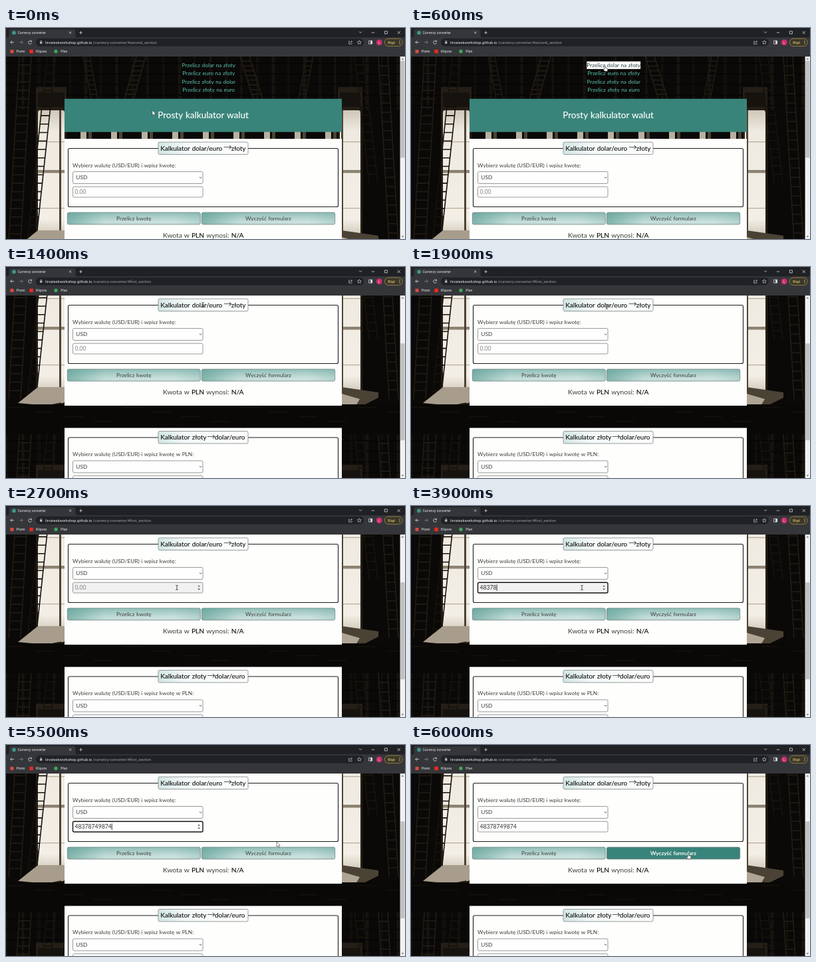
Write an HTML page that moves like this. It is 600 by 318 pixels and loops after 6100 ms.

```html
<!DOCTYPE html>
<html lang="pl">
<head>
<meta charset="utf-8">
<title>Currency converter</title>
<style>
  html, body { margin: 0; width: 100%; height: 100%; overflow: hidden; background: #0e0b08; }
  svg { display: block; width: 100%; height: 100%; }
  .page text { font-family: Lato, "Open Sans", sans-serif; word-spacing: .057em; fill: #3d3d3d; }
  .page .link text { fill: #5cc3b1; }
  .page .link.on text { fill: #24433f; }
  .link rect { fill: none; }
  .link.on rect { fill: #fff; }
  .page .strong { fill: #111; stroke: #111; stroke-width: .1; }
  .page .title { fill: #fff; stroke: #fff; stroke-width: .15; }
  .page .btn.on text { fill: #fff; stroke: #fff; stroke-width: .2; }
  .btn.on .face { fill: #39847a; }
  .btn.on .shade { display: none; }
  .ui text { font-family: Roboto, "Open Sans", sans-serif; fill: #e8eaed; }
  .line { fill: none; stroke: #dfe1e5; stroke-width: .75; }
</style>
</head>
<body>
<svg id="stage" viewBox="0 0 600 318" preserveAspectRatio="none"></svg>
<script>
const LOOP = 6100, STEP = 100, JUMP = 1400, SCROLL = 124;
const AMOUNT = '48378749874', TYPED = [1, 2, 4, 5, 7, 9, 11];
const LINKS = ['dolar na złoty', 'euro na złoty', 'złoty na dolar', 'złoty na euro'];
const PATH = [
  [0, 220, 124], [700, 296, 53], [1300, 296, 53], [1400, 296, 57], [1800, 296, 57],
  [2600, 257, 123], [4900, 257, 123], [5000, 256, 127], [5300, 345, 141],
  [5600, 438, 148], [5700, 430, 159], [5900, 417, 163.5]
];

const rect = (x, y, w, h, fill, more = '') =>
  `<rect x="${x}" y="${y}" width="${w}" height="${h}" fill="${fill}" ${more}/>`;
const text = (x, y, size, str, more = '') =>
  `<text x="${x}" y="${y}" font-size="${size}" ${more}>${str}</text>`;
const line = (d, more = '') => `<path d="${d}" class="line" ${more}/>`;
const repeat = (n, fn) => Array.from({ length: n }, (_, i) => fn(i)).join('');
const middle = 'text-anchor="middle"';

function ladder(x1, y1, x2, y2, w, n, color, weight = 1.6) {
  let d = `M${x1} ${y1}L${x2} ${y2}M${x1 + w} ${y1}L${x2 + w} ${y2}`;
  for (let i = 1; i < n; i++) d += `M${x1 + (x2 - x1) * i / n} ${y1 + (y2 - y1) * i / n}h${w}`;
  return `<path d="${d}" fill="none" stroke="${color}" stroke-width="${weight}"/>`;
}

// Tall window: dark lintel, two rows of bright panes, one mullion
function tallWindow(x, w, mullion) {
  return rect(x - 3, 46, w + 6, 242, '#241e16') + rect(x, 54, w, 22, '#16130e') +
    rect(x, 81, w, 205, 'url(#day)', 'rx="3"') +
    rect(x, 128, w, 1.2, '#b5aa98') + rect(x, 171, w, 4.5, '#8d8271') +
    rect(x, 228, w, 1.2, '#b5aa98') + rect(mullion, 81, 3, 205, '#4d4336');
}

// Old library: dark shelves above, windows at both sides
function room() {
  return rect(0, 0, 600, 333.5, '#0a0907') +
    repeat(26, i => rect(i * 23.5, 0, 3 + i % 3, 80, i % 2 ? '#17130e' : '#110f0b')) +
    repeat(5, i => rect(0, 9 + i * 16, 600, 2, '#060504', 'opacity=".75"')) +
    ladder(116, 0, 128, 64, 10, 9, '#1f1912') + ladder(196, 0, 178, 64, 14, 9, '#241d15') +
    ladder(352, 0, 372, 64, 14, 9, '#241d15') + ladder(452, 0, 440, 64, 10, 9, '#1f1912') +
    repeat(9, i => rect(112 + i * 46, 113, 9, 12, '#b9b0a1') + rect(124 + i * 46, 113, 5, 12, '#4b4337')) +
    tallWindow(48, 40, 80) + tallWindow(502, 31, 504) +
    ladder(20, 0, 4, 280, 18, 22, '#231b13') + ladder(62, 0, 32, 280, 13, 22, '#17120d') +
    ladder(560, 0, 576, 280, 14, 20, '#241c14') + ladder(524, 0, 546, 190, 13, 15, '#17130e') +
    '<path d="M18 286L48 262H88V284L60 290Z" fill="#a89d8c"/>' +
    '<path d="M505 262L560 270V278L536 290H505Z" fill="#4b4236"/>' +
    '<path d="M505 272L532 280 526 290H505Z" fill="#b0a594"/>' +
    rect(0, 288, 600, 46, '#090806') +
    repeat(14, i => rect(i * 44, 292 + i % 4 * 7, 28, 1.5, '#15110c'));
}

function button(id, x, w, label) {
  const box = `rx="2.2" stroke="#71817f" stroke-width=".8"`;
  return `<g class="btn" id="${id}">` +
    `<rect class="face" x="${x}" y="278" width="${w}" height="18" fill="url(#side)" ${box}/>` +
    `<rect class="shade" x="${x}" y="278" width="${w}" height="18" fill="url(#top)" rx="2.2"/>` +
    text(x + w / 2, 289.8, 8.25, label, middle) + '</g>';
}

function card(n, dy, from, to, arrowX, label) {
  return `<g transform="translate(0 ${dy})">` +
    rect(88, 167, 417, 166, '#fefefc') +
    rect(93.5, 181.5, 406, 88, 'none', 'rx="2" stroke="#1c1c1c" stroke-width="1.1"') +
    rect(229, 172, 135, 18.5, 'url(#legend)', 'rx="2" stroke="#7b8583" stroke-width=".8"') +
    text(232.3, 184.8, 9.95, from, 'class="strong"') +
    text(arrowX, 185.2, 12.5, '→', 'style="font-family:\'Noto Sans CJK JP\',\'DejaVu Sans\',sans-serif"') +
    text(arrowX + 11.5, 184.8, 9.95, to, 'class="strong"') +
    text(100, 209.8, 8.28, label) +
    rect(100.5, 216.5, 195.5, 18, '#fefefe', 'rx="2" stroke="#808080" stroke-width=".8"') +
    text(105.3, 228.4, 8.3, 'USD') +
    '<path d="M291 224.6l1.6 1.7 1.6-1.7" fill="none" stroke="#222" stroke-width=".8"/>' +
    rect(100.5, 239.2, 195.5, 15.8, '#fefefe', `id="field${n}" rx="2" stroke="#808080" stroke-width=".8"`) +
    text(103.5, 250.1, 8.67, '0.00', `id="value${n}" style="fill:#858585"`) +
    button('calc' + n, 92.3, 200, 'Przelicz kwotę') + button('clear' + n, 294.3, 200.4, 'Wyczyść formularz') +
    text(236, 315.9, 10.25, 'Kwota w <tspan class="strong">PLN</tspan> wynosi: <tspan class="strong">N/A</tspan>') +
    '</g>';
}

function page() {
  return `<g class="page" id="page"><g transform="translate(0 43)">${room()}</g>` +
    `<g transform="translate(0 376)">${room()}</g>` +
    LINKS.map((s, i) => `<g class="link" id="link${i}">` +
      `<rect x="264.3" y="${50.4 + i * 12.45}" width="80.8" height="11.4"/>` +
      text(304.7, 58.9 + i * 12.45, 8.3, 'Przelicz ' + s, middle) + '</g>').join('') +
    rect(88, 106.7, 417, 50, '#39847a') +
    text(296.5, 136, 13.5, 'Prosty kalkulator walut', 'class="title" ' + middle) +
    card(1, 0, 'Kalkulator dolar/euro', 'złoty', 327.2, 'Wybierz walutę (USD/EUR) i wpisz kwotę:') +
    card(2, 199.5, 'Kalkulator złoty', 'dolar/euro', 302.4, 'Wybierz walutę (USD/EUR) i wpisz kwotę w PLN:') +
    '<path id="spin" d="M288.4 245.6l1.7-2.2 1.7 2.2zM288.4 248.6l1.7 2.2 1.7-2.2z" fill="#444"/>' +
    '<rect id="caret" y="242.3" width=".8" height="9.6" fill="#111"/></g>';
}

function browser() {
  return '<g class="ui">' +
    rect(592.6, 43, 7.4, 275, '#f1f1f1') + rect(593.2, 0, 6.2, 146, '#c1c1c1', 'id="thumb"') +
    '<path d="M594.6 47.4l1.8-2 1.8 2zM594.6 313.4l1.8 2 1.8-2z" fill="#606060"/>' +
    rect(0, 0, 600, 14.5, '#202124') + rect(0, 14, 600, 29, '#35363a') +
    '<path d="M2 14.5Q4.5 14 4.5 11V4Q4.5 1.8 7 1.8H102Q104.5 1.8 104.5 4V11Q104.5 14 107 14.5Z" fill="#35363a"/>' +
    '<circle cx="12" cy="7.2" r="2.9" fill="#3f9488"/>' +
    text(17.5, 9, 5.05, 'Currency converter') +
    line('M95 5.4l3.2 3.2m0-3.2l-3.2 3.2M110.2 7h4.6m-2.3-2.3v4.6') +
    line('M531 5.4l2 2 2-2M549.8 7h4.4M569.4 4.8h4v4h-4zM588.6 4.8l4.2 4.2m0-4.2l-4.2 4.2') +
    line('M12 21.5H6.8m2.3-2.4l-2.4 2.4 2.4 2.4') +
    line('M20 21.5h5.2m-2.3-2.4l2.4 2.4-2.4 2.4', 'style="stroke:#85878b"') +
    line('M38.2 20.3a2.5 2.5 0 1 0 .3 2.2M38.4 18.6v2h-2') +
    rect(45, 15.7, 493, 11.8, '#202124', 'rx="5.9"') +
    rect(51, 20.9, 3.4, 2.7, '#b8babd') +
    line('M51.7 21v-1a1 1 0 0 1 2 0v1', 'style="stroke:#b8babd"') +
    text(59, 23.5, 5.75, 'lirvateskworkshop.github.io') +
    text(130.5, 23.5, 5.75, '', 'id="path" style="fill:#9aa0a6"') +
    line('M517 20h-1.4v4.2h4.6v-1.3M517.3 22.6q.3-2.2 3-2.2m-1.2-1.4l1.5 1.4-1.5 1.5', 'style="stroke-width:.6"') +
    line('M531.3 18.6l.9 2 2.1.2-1.6 1.4.5 2.1-1.9-1.1-1.9 1.1.5-2.1-1.6-1.4 2.1-.2z', 'style="stroke-width:.6"') +
    line('M545.6 19.2h5v4.8h-5z') + rect(548.2, 19.2, 2.4, 4.8, '#dfe1e5') +
    '<circle cx="561.2" cy="21.7" r="4.5" fill="#c92d6b"/>' +
    text(561.2, 23.6, 5, 'L', middle) +
    rect(569.3, 16, 27, 11.4, '#3a372b', 'rx="5.7" stroke="#b79a45" stroke-width=".7"') +
    text(574.3, 23.6, 5.2, 'Błąd', 'style="fill:#f6d873"') +
    repeat(3, i => `<circle cx="592" cy="${19.7 + i * 2}" r=".6" fill="#f6d873"/>`) +
    rect(6.5, 32.8, 5, 5, '#dd4b3e') + text(15.6, 37.2, 5.2, 'Pismi') +
    rect(35.4, 32.6, 5.4, 5.4, '#f0281e') + text(45, 37.2, 5.2, 'Klipora') +
    '<circle cx="75" cy="35.3" r="2.7" fill="#3fa65a"/>' + text(82.2, 37.2, 5.2, 'Plan') +
    '</g>';
}

const pointers = {
  arrow: '<path d="M0 0V7.6L1.8 6 3 8.6 4.2 8 3 5.6H5.3Z" fill="#fff" stroke="#222" stroke-width=".5"/>',
  beam: '<path d="M-1.8-3.4Q0-3.4 0-2.6 0-3.4 1.8-3.4M0-2.8V2.8M-1.8 3.4Q0 3.4 0 2.6 0 3.4 1.8 3.4" fill="none" stroke="#222" stroke-width=".8"/>',
  hand: '<path d="M-.8.4Q0-.5.8.4V3.3L3.6 3.9Q4.2 4.1 4.1 5L3.5 8.3H-.4L-2.8 5.2Q-2.5 4.2-.8 5.2Z" fill="#fff" stroke="#222" stroke-width=".55"/>'
};

const gradient = (id, x2, y2, stops) =>
  `<linearGradient id="${id}" x1="0" y1="0" x2="${x2}" y2="${y2}">` +
  stops.map(([at, color, a = 1]) => `<stop offset="${at}" stop-color="${color}" stop-opacity="${a}"/>`).join('') +
  '</linearGradient>';

document.getElementById('stage').innerHTML = '<defs>' +
  gradient('day', 0, 1, [[0, '#cfc7b8'], [.15, '#eeeae0'], [.8, '#f3efe6'], [1, '#b9ae9c']]) +
  gradient('side', 1, 0, [[0, '#7fb3ab'], [.28, '#c2dcd8'], [.8, '#cbe1de'], [1, '#b2d2cd']]) +
  gradient('top', 0, 1, [[0, '#5b9e94', .5], [.75, '#5b9e94', 0]]) +
  gradient('legend', 1, 0, [[0, '#d2e6e3'], [.3, '#f3f9f8'], [1, '#fdfefd']]) +
  '</defs>' + page() + browser() +
  '<g id="pointer">' + Object.keys(pointers).map(k => `<g id="${k}">${pointers[k]}</g>`).join('') + '</g>';

const el = id => document.getElementById(id);
const show = (id, on) => { el(id).style.display = on ? '' : 'none'; };
const inside = ([x, y], x1, y1, x2, y2) => x >= x1 && x <= x2 && y >= y1 && y <= y2;

function position(t) {
  const i = PATH.findIndex(p => p[0] > t);
  if (i < 0) return PATH[PATH.length - 1].slice(1);
  const [t0, x0, y0] = PATH[i - 1], [t1, x1, y1] = PATH[i];
  let k = (t - t0) / (t1 - t0);
  if (t < 5000) k = k * k * (3 - 2 * k);
  return [x0 + (x1 - x0) * k, y0 + (y1 - y0) * k];
}

function caretOn(t) {
  if (t < 3100 || t >= 5800) return false;
  if (t < 3600) return t < 3400;
  if (t < 4700) return t < 4400;
  return Math.floor((t - 4700) / 300) % 2 === 0;
}

function draw(time) {
  const t = Math.floor(time % LOOP / STEP) * STEP;
  const scroll = t >= JUMP ? SCROLL : 0;
  const screen = position(t), at = [screen[0], screen[1] + scroll];

  el('page').setAttribute('transform', `translate(0 ${-scroll})`);
  el('thumb').setAttribute('y', 49.5 + scroll * .53);
  el('path').textContent = `/currency-converter/#${scroll ? 'first' : 'second'}_section`;

  let overLink = false;
  LINKS.forEach((_, i) => {
    const on = inside(at, 264, 50.4 + i * 12.45, 345, 62 + i * 12.45);
    el('link' + i).classList.toggle('on', on);
    overLink = overLink || on;
  });
  const overClear = inside(at, 294, 278, 495, 296);
  el('clear1').classList.toggle('on', overClear);

  const overField = inside(at, 100, 239, 296.5, 255.5);
  const focused = t >= 3100 && t < 5800;
  const field = el('field1');
  field.setAttribute('fill', overField ? '#f1f1f1' : '#fefefe');
  field.setAttribute('stroke', focused ? '#151515' : '#808080');
  field.setAttribute('stroke-width', focused ? 1.4 : .8);
  show('spin', overField || focused);

  const count = t < 3600 ? 0 : TYPED[Math.min((t - 3600) / STEP, TYPED.length - 1)];
  const value = el('value1');
  value.textContent = count ? AMOUNT.slice(0, count) : '0.00';
  value.style.fill = count ? '#333' : '#858585';
  show('caret', caretOn(t));
  el('caret').setAttribute('x', 103.6 + (count ? value.getComputedTextLength() : 0));

  const overText = overField || inside(at, 231, 172, 362, 191);
  const kind = overLink || overClear ? 'hand' : overText ? 'beam' : 'arrow';
  for (const k in pointers) show(k, k === kind);
  el('pointer').setAttribute('transform', `translate(${screen[0]} ${screen[1]})`);
}

const start = performance.now();
function tick() {
  draw(performance.now() - start);
  requestAnimationFrame(tick);
}
tick();
</script>
</body>
</html>
```
